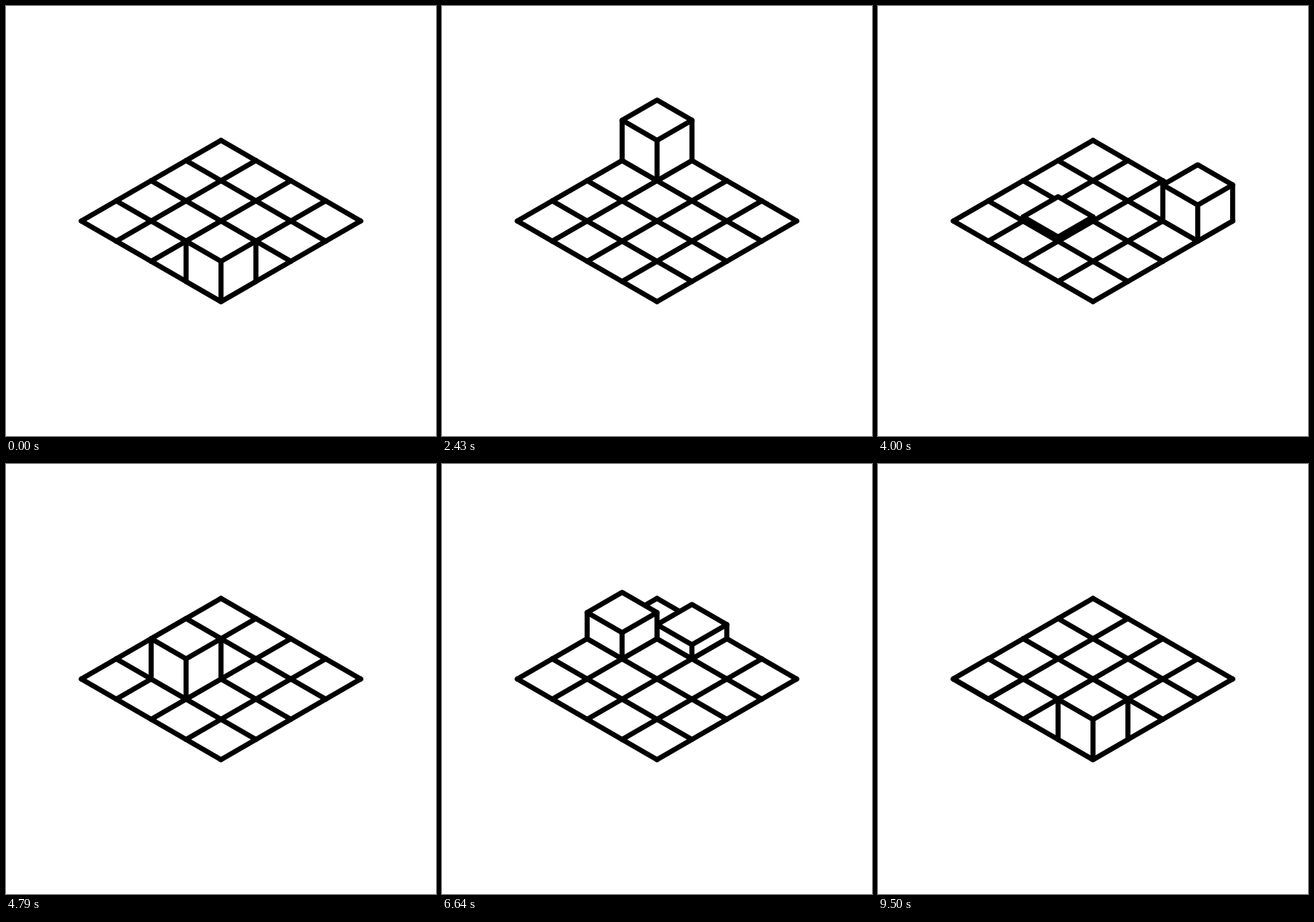
These frames come from a looping animation (640 px wide and 640 px high, 9570 ms). An HTML page with a canvas:

```html
<!DOCTYPE html>
<html lang="en">
<head>
<meta charset="utf-8">
<title>Isometric cube</title>
<style>
  html, body { margin: 0; width: 100%; height: 100%; overflow: hidden; background: #fff; }
  canvas { display: block; width: 640px; height: 640px; }
</style>
</head>
<body>
<canvas id="stage" width="640" height="640"></canvas>
<script>
const ctx = document.getElementById('stage').getContext('2d');

const LOOP = 9570;       // ms
const SHOWN_RATE = 14;   // pictures per second
const MOTION_RATE = 25;  // steps per second of the underlying motion
const MOVE = 1.2;        // seconds per move
const CELLS = 4;
const SIZE = 60;
const DX = SIZE * Math.cos(Math.PI / 6);
const DY = SIZE / 2;

// Moves alternate: slide to the next stop, then sink while rising at the one after.
const STOPS = [[3, 3], [0, 3], [0, 0], [3, 0], [1, 2], [1, 0], [0, 1], [0, 3]];

const project = (i, j, h = 0) => [320 + (i - j) * DX, 200 + (i + j) * DY - h];

// Equivalent to cubic-bezier(.8, 0, .2, 1).
function ease(x) {
  let lo = 0, hi = 1;
  for (let n = 0; n < 30; n++) {
    const s = (lo + hi) / 2, r = 1 - s;
    const bx = 3 * r * r * s * 0.8 + 3 * r * s * s * 0.2 + s * s * s;
    if (bx < x) lo = s; else hi = s;
  }
  return lo * lo * (3 - 2 * lo);
}

function trace(points, closed) {
  ctx.beginPath();
  points.forEach(p => ctx.lineTo(...p));
  if (closed) ctx.closePath();
}

function line(...points) {
  trace(points, false);
  ctx.stroke();
}

function drawGrid() {
  for (let n = 0; n <= CELLS; n++) {
    line(project(n, 0), project(n, CELLS));
    line(project(0, n), project(CELLS, n));
  }
}

function drawCube(i, j, h) {
  if (h <= 0) return;
  const back = project(i, j, h);
  const right = project(i + 1, j, h);
  const left = project(i, j + 1, h);
  const front = project(i + 1, j + 1, h);
  const foot = project(i + 1, j + 1);

  trace([back, right, project(i + 1, j), foot, project(i, j + 1), left], true);
  ctx.fill();
  ctx.stroke();
  line(left, front, right);
  line(front, foot);
}

function draw(ms) {
  const hundredths = Math.floor((ms % LOOP) / 10);
  const shown = Math.floor((hundredths + 0.5) * SHOWN_RATE / 100);
  const time = Math.floor((shown + 0.5) * MOTION_RATE / SHOWN_RATE) / MOTION_RATE;
  const move = Math.floor(time / MOVE + 1e-9);
  const p = ease(Math.max(0, time / MOVE - move));
  const a = STOPS[move % STOPS.length];
  const b = STOPS[(move + 1) % STOPS.length];

  ctx.fillStyle = '#fff';
  ctx.strokeStyle = '#000';
  ctx.lineWidth = 7.5;
  ctx.lineCap = ctx.lineJoin = 'round';
  ctx.fillRect(0, 0, 640, 640);
  drawGrid();

  if (move % 2 === 0) {
    drawCube(a[0] + (b[0] - a[0]) * p, a[1] + (b[1] - a[1]) * p, SIZE);
  } else {
    drawCube(...a, SIZE * (1 - p));
    drawCube(...b, SIZE * p);
  }
}

const start = performance.now();
function tick() {
  draw(performance.now() - start);
  requestAnimationFrame(tick);
}
tick();
</script>
</body>
</html>
```
